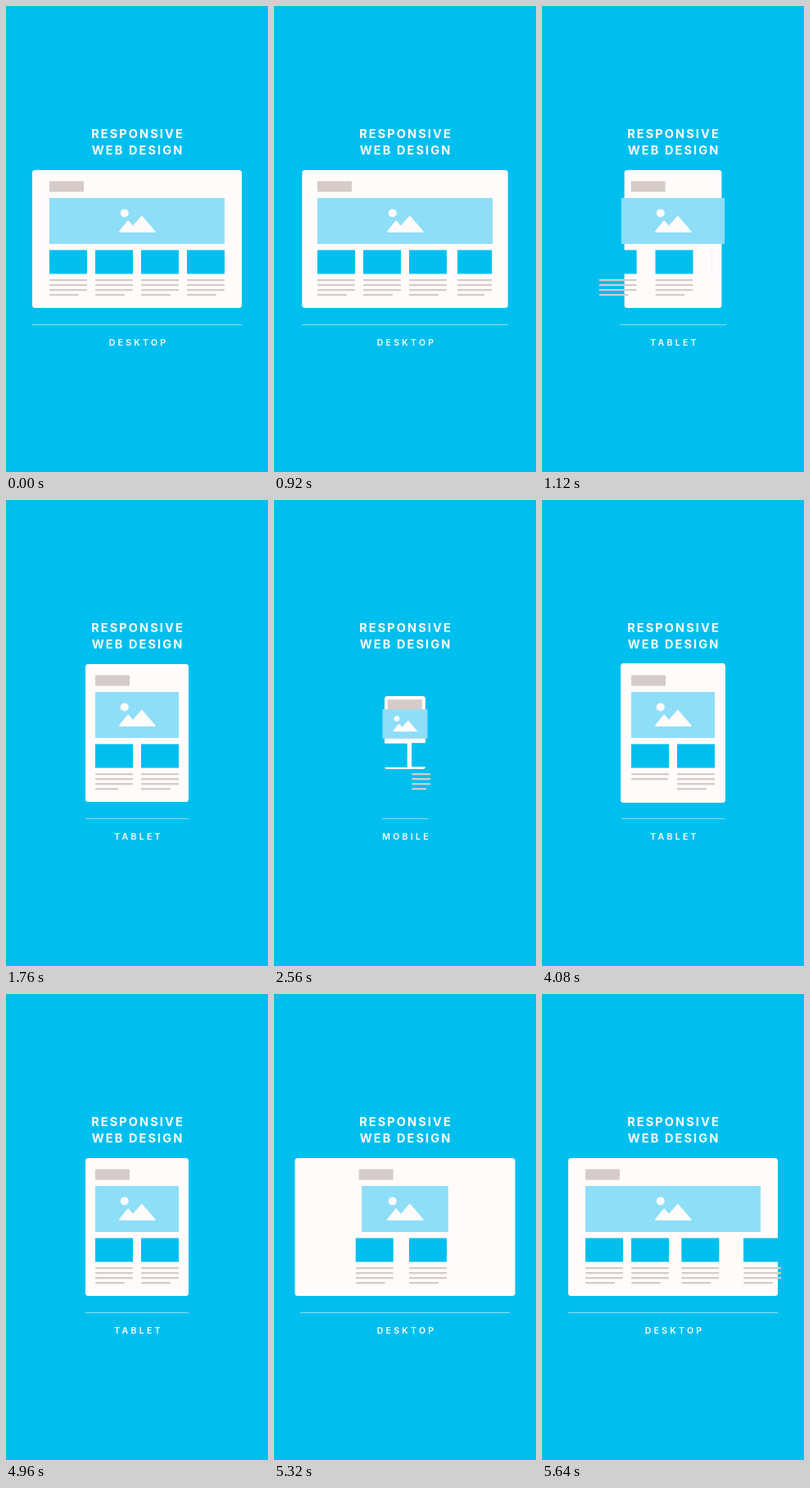
Recreate the animation shown at these times as an HTML page. Size 320x568 px, loop 5720 ms.

```html
<!DOCTYPE html>
<html lang="en">
<head>
<meta charset="utf-8">
<title>Responsive web design</title>
<style>
  html, body { margin: 0; width: 100%; height: 100%; overflow: hidden; background: #00bfef; }
  svg { display: block; width: 100%; height: 100%; }
  text { font-family: Inter, "Open Sans", sans-serif; fill: #fffbfa; text-anchor: middle; }
  .title { font-size: 14.5px; font-weight: 700; letter-spacing: 2.1px; }
  .label { font-size: 10.5px; font-weight: 600; letter-spacing: 3.3px; }
  .panel, .icon { fill: #fffbfa; }
  .icon path { stroke: #fffbfa; stroke-width: 2; stroke-linejoin: round; }
  .logo, .line { fill: #d5cbc8; }
  .hero { fill: #8edef8; }
  .thumb { fill: #00bfef; }
  .rule { fill: #8fdcf7; }
</style>
</head>
<body>
<svg viewBox="0 0 320 568">
  <text class="title" x="161" y="161">RESPONSIVE</text>
  <text class="title" x="161" y="180.5">WEB DESIGN</text>
  <rect class="panel" id="panel" rx="3.5"/>
  <rect class="logo" id="logo" width="42" height="13" rx="1"/>
  <g id="columns"></g>
  <rect class="hero" id="hero"/>
  <g class="icon" id="icon">
    <circle cx="-15.2" cy="-9.6" r="5"/>
    <path d="M-21 13 L-11 .5 L-5 7.5 L5.8 -5.2 L21.5 13 Z"/>
  </g>
  <rect class="rule" id="rule" y="388" height="1"/>
  <text class="label" id="label" x="162" y="414"></text>
</svg>
<script>
const LOOP = 5720, STEP = 40, CENTER = 160, OVERSHOOT = .1, PEAK = .6;

const desktop = {
  label: "DESKTOP", columns: 4, left: 53, pitch: 56, thumbWidth: 46, thumbTop: 297.5,
  width: 256, top: 200, bottom: 368, logoTop: 213.5,
  heroWidth: 214, heroTop: 234, heroHeight: 56, icon: 1
};
const tablet = { ...desktop, label: "TABLET", columns: 2, left: 109, width: 126, heroWidth: 102 };
const mobile = {
  label: "MOBILE", columns: 1, left: 139, pitch: 32, thumbWidth: 42, thumbTop: 295,
  width: 54, top: 237, bottom: 330, logoTop: 243.5,
  heroWidth: 42, heroTop: 261, heroHeight: 30, icon: .66
};

// The frame resizes first; the content follows, later when it needs new room.
const changes = [
  { to: tablet, frame: 890, content: 890, grows: false },
  { to: mobile, frame: 2330, content: 2330, grows: false },
  { to: tablet, frame: 3700, content: 3700, grows: true },
  { to: desktop, frame: 5056, content: 5240, grows: true }
];

const ease = p => (1 - Math.cos(Math.PI * Math.min(1, Math.max(0, p)))) / 2;
const swing = p => (1 + OVERSHOOT) * ease(p / PEAK) - OVERSHOOT * ease((p - PEAK) / (1 - PEAK));

const panelTiming = () => ({ part: "frame", delay: 0, duration: 440, curve: swing });
const ruleTiming = () => ({ part: "frame", delay: 0, duration: 260 });
const heroTiming = () => ({ delay: 50, duration: 260 });
const logoTiming = () => ({ delay: 40, duration: 200 });
const slideTiming = i => ({ grows }) => ({ delay: grows ? 80 * i : 120 - 45 * i, duration: 300 });
const revealTiming = i => ({ grows }) => ({ delay: grows ? 80 * i : 75 * (3 - i), duration: 160 });

function blend(t, get, timing) {
  return changes.reduce((value, change) => {
    const { part = "content", delay, duration, curve = ease } = timing(change);
    return value + (get(change.to) - value) * curve((t - change[part] - delay) / duration);
  }, get(desktop));
}

// The first column drops its text bottom line first, then regains it top line first.
const textShown = (t, line) =>
  1 - ease((t - 1980 + 100 * line) / 260) + ease((t - 3900 - 90 * line) / 100);

const $ = id => document.getElementById(id);
const set = (el, attrs) => {
  for (const name in attrs) el.setAttribute(name, attrs[name]);
};
const centered = width => ({ x: CENTER - width / 2, width });

const addRect = (name, attrs) => {
  const el = document.createElementNS("http://www.w3.org/2000/svg", "rect");
  set(el, { class: name, ...attrs });
  return $("columns").appendChild(el);
};

const columns = Array.from({ length: desktop.columns }, () => ({
  thumb: addRect("thumb", { height: 29 }),
  lines: [0, 1, 2, 3].map(i => addRect("line", { y: 333 + 6 * i, height: 2.3, rx: .8 }))
}));

function drawColumn({ thumb, lines }, i, t) {
  const slide = get => blend(t, get, slideTiming(i));
  const x = slide(layout => layout.left + layout.pitch * i);
  const shown = blend(t, layout => Number(layout.columns > i), revealTiming(i));
  set(thumb, {
    x,
    y: slide(layout => layout.thumbTop),
    width: shown * slide(layout => layout.thumbWidth)
  });
  lines.forEach((line, n) => {
    const length = n === 3 ? 36 : 46;
    set(line, { x, width: length * (i ? shown : textShown(t, n)) });
  });
}

function draw(t) {
  const value = (key, timing) => blend(t, layout => layout[key], timing);

  const top = value("top", panelTiming);
  set($("panel"), {
    ...centered(value("width", panelTiming)), y: top, height: value("bottom", panelTiming) - top
  });
  set($("logo"), { x: value("left", logoTiming), y: value("logoTop", logoTiming) });

  const heroTop = value("heroTop", heroTiming), heroHeight = value("heroHeight", heroTiming);
  set($("hero"), { ...centered(value("heroWidth", heroTiming)), y: heroTop, height: heroHeight });
  const middle = heroTop + heroHeight / 2;
  set($("icon"), {
    transform: `translate(${CENTER} ${middle}) scale(${value("icon", logoTiming)})`
  });

  columns.forEach((column, i) => drawColumn(column, i, t));
  set($("rule"), centered(value("width", ruleTiming)));

  const latest = changes.filter(change => t >= change.frame + 150).pop();
  $("label").textContent = (latest ? latest.to : desktop).label;
}

const start = performance.now();
function tick() {
  const t = (performance.now() - start) % LOOP;
  draw(Math.floor(t / STEP) * STEP);
  requestAnimationFrame(tick);
}
tick();
</script>
</body>
</html>
```
